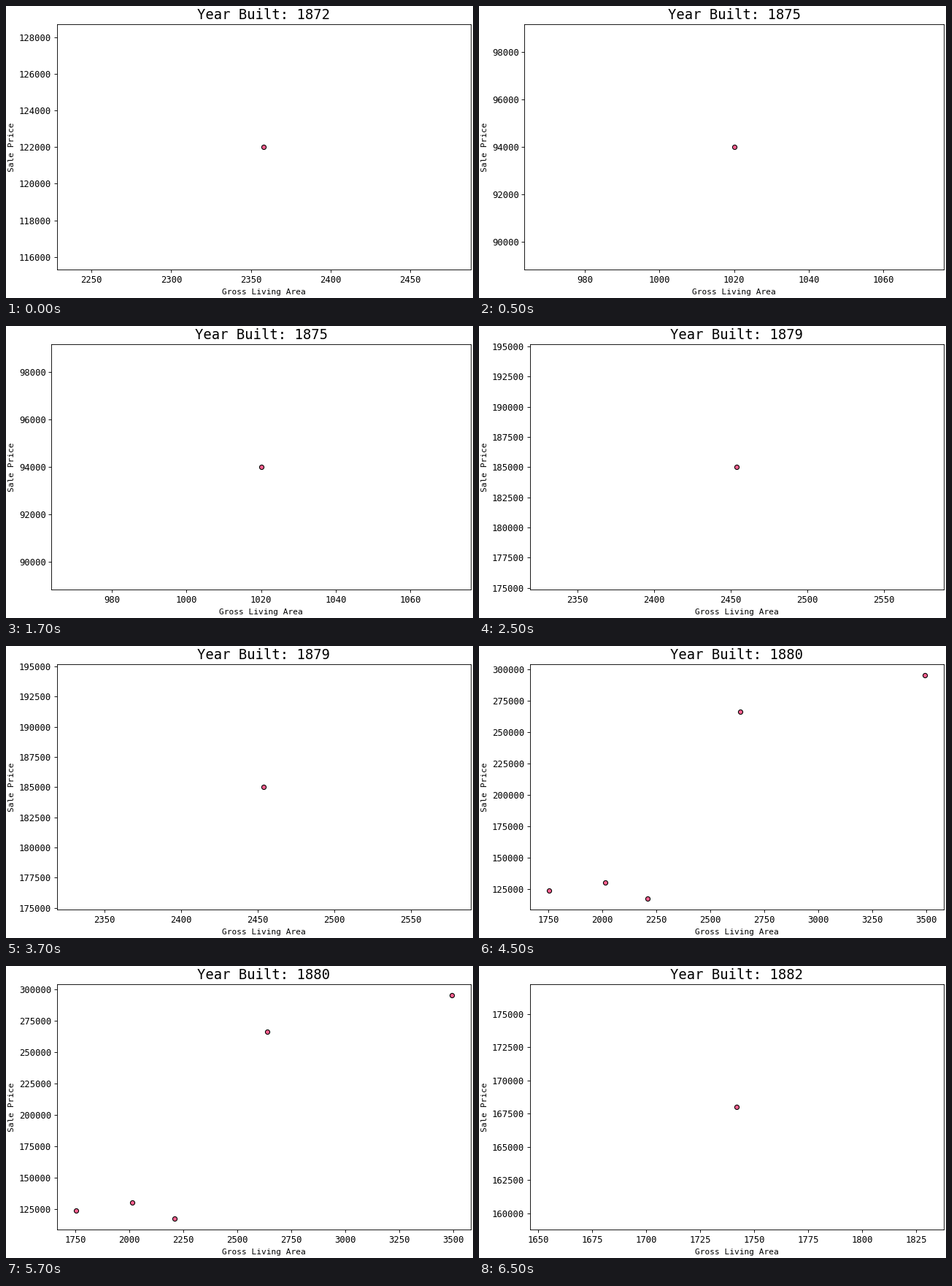
Animation, 640 px wide and 400 px high, one loop 8 s. Source, as a matplotlib script:

```python
import matplotlib.pyplot as plt
from matplotlib.animation import FuncAnimation

plt.rcParams["font.family"] = "DejaVu Sans Mono"

STEP_MS = 500
FRAMES = 16
STEPS_PER_YEAR = 4
LEAD_STEPS = 3  # the loop opens near the end of the first year's turn

# Year built -> sold homes as (living area, price in thousands)
SALES = {
    1872: [(2358, 122)],
    1875: [(1020, 94)],
    1879: [(2454, 185)],
    1880: [(1752, 124), (2014, 130.5), (2210, 117.5), (2640, 266), (3493, 295)],
    1882: [(1742, 168)],
}
YEARS = sorted(SALES)

fig, ax = plt.subplots(figsize=(8, 5), dpi=80, layout="constrained")


def draw(step):
    year = YEARS[(step + LEAD_STEPS) // STEPS_PER_YEAR]
    areas, thousands = zip(*SALES[year])
    prices = [1000 * t for t in thousands]
    ax.clear()
    ax.scatter(areas, prices, s=30, c="#ff6090", edgecolors="black", linewidths=1)
    ax.set_title(f"Year Built: {year}", fontsize=17)
    ax.set_xlabel("Gross Living Area", fontsize=10)
    ax.set_ylabel("Sale Price", fontsize=10)
    ax.tick_params(labelsize=11)


anim = FuncAnimation(fig, draw, frames=FRAMES, init_func=lambda: None,
                     interval=STEP_MS, repeat=True, repeat_delay=0)
plt.show()
```
